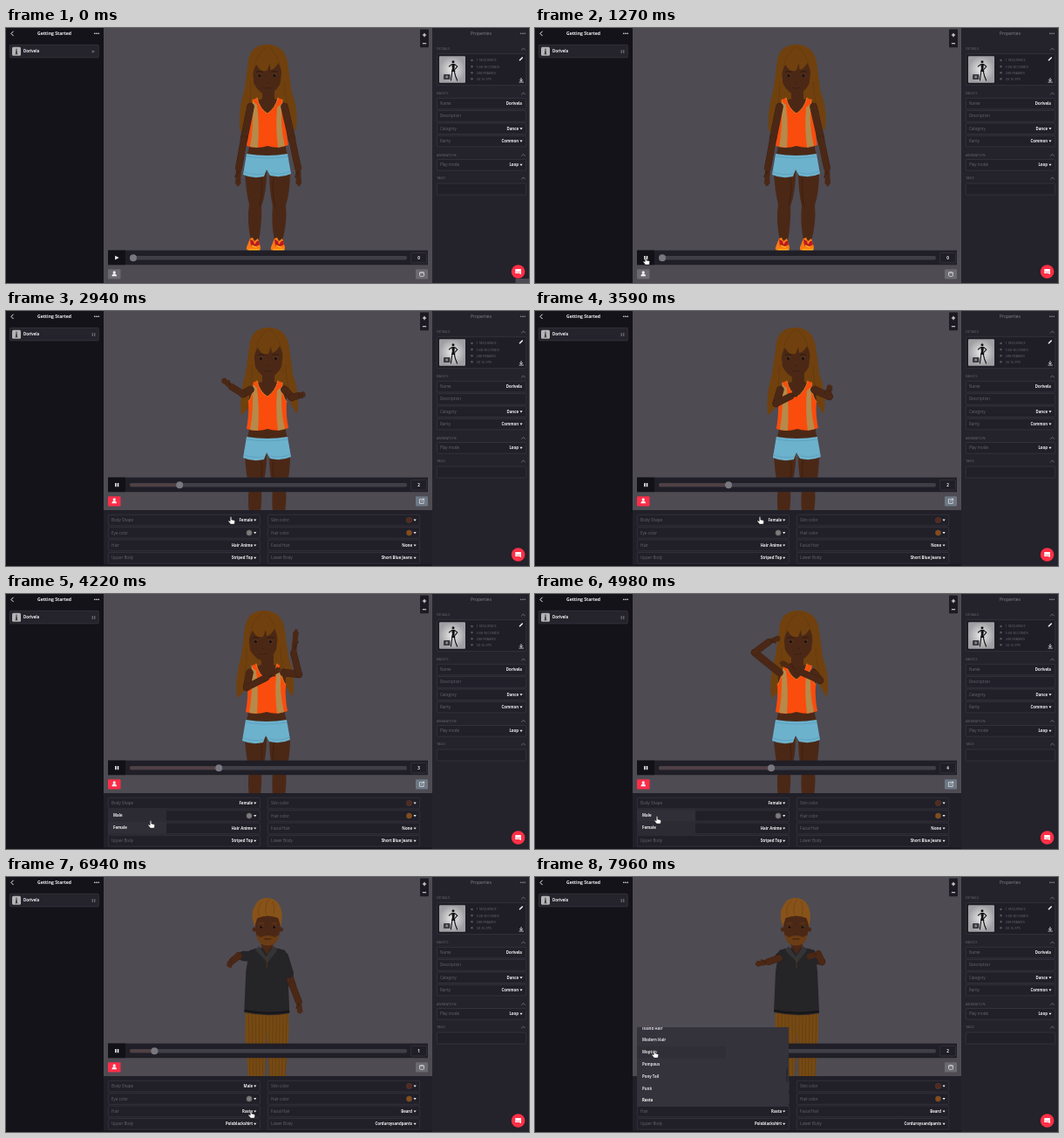
Recreate the animation shown at these times as an HTML page. Size 600x292 px, loop 7990 ms.

```html
<!DOCTYPE html>
<html lang="en">
<head>
<meta charset="utf-8">
<title>Character animation editor</title>
<style>
  html, body { margin: 0; width: 100%; height: 100%; overflow: hidden; background: #16141b; }
  svg { display: block; width: 100vw; height: 100vh; }
  text { font-family: "Open Sans", "Noto Sans", sans-serif; }
</style>
</head>
<body>
<svg id="view" viewBox="0 0 600 292" xmlns="http://www.w3.org/2000/svg"></svg>
<script>
const LOOP = 7990;
const SWITCH = { play: 1190, start: 1430, panel: 2230, shapeMenu: 3800, load: 5450, loaded: 6250, hairMenu: 7000 };
const SPEED = 0.0352; // slider pixels per ms

const WHITE = '#f1f0f2', DIM = '#686670', LINE = '#3a3841', RED = '#ff2d48';

const rect = (x, y, w, h, fill, extra = '') =>
  `<rect x="${x}" y="${y}" width="${w}" height="${h}" fill="${fill}" ${extra}/>`;
const path = (d, fill, extra = '') => `<path d="${d}" fill="${fill}" ${extra}/>`;
const stroke = (d, color, w, extra = '') =>
  path(d, 'none', `stroke="${color}" stroke-width="${w}" stroke-linecap="round" stroke-linejoin="round" ${extra}`);
const circle = (x, y, r, fill, extra = '') => `<circle cx="${x}" cy="${y}" r="${r}" fill="${fill}" ${extra}/>`;
const text = (x, y, s, { size = 4.35, fill = WHITE, bold = true, anchor = 'start' } = {}) =>
  `<text x="${x}" y="${y}" font-size="${size}" fill="${fill}" font-weight="${bold ? 700 : 400}" text-anchor="${anchor}">${s}</text>`;
const label = (x, y, s, size = 4.5) => text(x, y, s, { size, fill: DIM, bold: false });
const group = (id, body) => `<g id="${id}">${body}</g>`;
const at = (x, y, body) => `<g transform="translate(${x} ${y})">${body}</g>`;
const box = (x, y, w, h, fill = 'none') => rect(x, y, w, h, fill, `rx="1" stroke="${LINE}" stroke-width=".7"`);
const arrow = (x, y) => path(`M${x - 1.6} ${y - 1}h3.2l-1.6 2.2z`, WHITE);
const dots = (x, y, fill) => [-2.2, 0, 2.2].map(d => circle(x + d, y, .8, fill)).join('');
const playIcon = (x, y, s, fill) => path(`M${x - s} ${y - s}l${2 * s} ${s}l${-2 * s} ${s}z`, fill);
const pauseIcon = (x, y, s, fill) =>
  rect(x - s, y - s, s * .75, s * 2, fill) + rect(x + s * .25, y - s, s * .75, s * 2, fill);

/* ---------- interface ---------- */
const NAME = 'Dorivela';

function leftPanel() {
  return rect(0, 0, 112, 292, '#15131a') +
    stroke('M8.3 4l-2.4 2.4l2.4 2.4', WHITE, 1) +
    text(55.5, 8.4, 'Getting Started', { size: 5.1, anchor: 'middle' }) + dots(104, 6.3, WHITE) +
    box(4.3, 19.3, 102, 14.6, '#25232b') + rect(7, 21.7, 10, 10, '#b4b3b6', 'rx="1.5"') +
    stroke('M12 24v3m0 0l-.8 3m.8-3l.8 3', '#333', 1) +
    text(20, 28.4, NAME) +
    group('listPlay', playIcon(100.5, 27, 1.8, '#65636b')) +
    group('listPause', pauseIcon(100.5, 27, 1.9, '#65636b'));
}

function rightPanel() {
  const heading = (y, s) => label(494, y + 1.4, s, 4.1) +
    stroke(`M591.5 ${y + 1}l2-2l2 2`, '#8b8991', .7);
  const field = (y, name, value, menu) => box(494.3, y, 102.4, 12.6, '#211f27') +
    label(498, y + 7.8, name) +
    text(menu ? 588 : 592, y + 7.8, value, { anchor: 'end' }) + (menu ? arrow(591, y + 6.3) : '');
  const facts = ['1 SEQUENCE', '9.68 SECONDS', '288 FRAMES', '30.16 FPS']
    .map((s, i) => circle(534.5, 37 + i * 7.1, 1.3, '#55535d') + label(539.5, 38.4 + i * 7.1, s, 3.9)).join('');
  return rect(489, 0, 111, 292, '#24222a') +
    text(545, 8.4, 'Properties', { size: 5, fill: '#85838b', anchor: 'middle', bold: false }) + dots(593, 6.3, '#92909a') +
    heading(24, 'DETAILS') + box(494.3, 29.6, 102.4, 36, '#1f1d25') +
    rect(497, 32.3, 30, 30.4, 'url(#thumb)', 'rx="1"') +
    circle(513, 38.8, 1.5, '#111') +
    path('M511.3 41h3.6l-.4 5.4l1 3.6h-4.6l1-4z', '#111') +
    stroke('M514.8 41.6l3 2.6l-2.6 3M511.4 41.6l-3 2.4M511.8 50l-.6 5l-.8 5M514.4 50l1.2 5l2 5', '#111', 1.1) +
    rect(502, 53, 7.5, 6, '#3b3940', 'rx="1"') + circle(505.7, 56, 1.4, '#8b8a90') + facts +
    stroke('M589.5 36.8l2.8-2.8', WHITE, 1.6) +
    stroke('M591 57.5v3m-1.5-1.2l1.5 1.5l1.5-1.5M589 62h4.4', WHITE, .8) +
    heading(75, 'BASICS') + field(80.3, 'Name', NAME) + field(94.6, 'Description', '') +
    field(108.9, 'Category', 'Dance', true) + field(123.3, 'Rarity', 'Common', true) +
    heading(145.4, 'ANIMATION') + field(150.5, 'Play mode', 'Loop', true) +
    heading(172, 'TAGS') + box(494.3, 178, 102.4, 13, '#211f27') +
    group('corner', rect(584.5, 287, 16, 5, '#4c4a53')) +
    circle(587.6, 279, 7.8, '#ff3047') +
    path('M584.3 276h6.6v6.2l-2-1.2h-4.6z', '#fff') + stroke('M585.8 279.4q1.8 1 3.6 0', RED, .6);
}

function controls() {
  return group('bar',
    rect(117, 254.6, 367, 16.6, '#201e26') + rect(117, 254.6, 20, 16.6, '#131118') +
    group('barPlay', playIcon(127.4, 263.1, 2.3, WHITE)) + group('barPause', pauseIcon(127.2, 263.1, 2.1, WHITE)) +
    rect(142, 260.9, 318, 4.6, '#403e46', 'rx="2"') +
    rect(142, 261.6, 1, 3.2, '#514144', 'id="progress" rx="1.5"') +
    circle(146, 263.2, 4, '#797780', 'id="knob"') +
    box(464.7, 257.4, 17.8, 11.6) +
    `<text id="count" x="473.6" y="264.9" font-size="4.6" font-weight="700" fill="${WHITE}" text-anchor="middle"></text>`) +
    rect(117, 276.2, 14.5, 11.2, '#6b6971', 'id="avatarButton" rx="1"') +
    circle(124.2, 279.9, 1.6, WHITE) + path('M121.3 284.2q.5-3 2.9-3t2.9 3z', WHITE) +
    rect(470, 276.2, 14, 11.2, '#6b6971', 'id="sideButton" rx="1"') +
    group('clockIcon', rect(474.5, 279.5, 5, 4.8, 'none', 'stroke="#eee" stroke-width=".7" rx="1"') + stroke('M474.8 280.8h4.4', '#eee', .6)) +
    group('exportIcon', stroke('M477 279.6h-2.6v4.8h4.8v-2M476.4 282l3.2-2.8m-1.8 0h1.8v1.8', '#eee', .7));
}

const LOOKS = {
  female: ['Female', 'Hair Anime', 'Striped Top', 'None', 'Short Blue Jeans'],
  male: ['Male', 'Rasta', 'Poloblackshirt', 'Beard', 'Corduroysandpants']
};

function panel() {
  const rowY = i => 233.3 + i * 14.4;
  const fields = (x, w, names) => names.map((s, i) =>
    box(x, rowY(i), w, 12.6, '#211f27') + label(x + 3.8, rowY(i) + 7.8, s) + arrow(x + w - 5.6, rowY(i) + 6.3)).join('');
  const values = ([shape, hair, top, beard, legs]) =>
    [[283.2, 0, shape], [283.2, 2, hair], [283.2, 3, top], [466, 2, beard], [466, 3, legs]]
      .map(([x, i, s]) => text(x, rowY(i) + 7.8, s, { anchor: 'end' })).join('');
  const swatch = (x, y, c) => circle(x, y, 3.2, c, 'stroke="#4a464e" stroke-width=".5"');
  return rect(112, 228, 377, 64, '#211f27') + rect(112, 290.3, 377, 1.7, '#17161f') +
    fields(117.3, 174, ['Body Shape', 'Eye color', 'Hair', 'Upper Body']) +
    fields(300.3, 174.4, ['Skin color', 'Hair color', 'Facial Hair', 'Lower Body']) +
    swatch(279, 254, '#7d7b79') + swatch(462.5, 239.4, '#55291a') + swatch(462.5, 254, '#894c15') +
    group('femaleValues', values(LOOKS.female)) + group('maleValues', values(LOOKS.male));
}

function menus() {
  const hair = ['Island Hair', 'Modern Hair', 'Moptop', 'Pompous', 'Pony Tail', 'Punk', 'Rasta'];
  return group('shapeMenu', rect(117, 245.3, 67, 31.6, '#2c2a32', 'rx="1"') +
      rect(117, 247.3, 67, 13, '#302e37', 'id="shapeHover"') +
      text(123, 255.4, 'Male') + text(123, 268.8, 'Female')) +
    group('hairMenu', rect(117, 172, 174, 91, '#34323b') +
      rect(117, 0, 102, 13.6, '#302e37', 'id="hairHover"') +
      `<g clip-path="url(#menuClip)">${hair.map((s, i) =>
        text(123, 174.6 + i * 13.8, s, { fill: i === 6 ? '#fff' : '#dddce0' })).join('')}</g>` +
      rect(288.2, 219, 1.8, 16, '#29272f', 'rx="1"'));
}

const hand = '<g id="hand">' + path('M-.8 0q.8-.8 1.6 0v3l3 .7q.9.3.8 1.2l-.6 3.2h-4.4l-2.4-3.2q-.4-.9.5-1l1.5.9z',
  '#fff', 'stroke="#222" stroke-width=".5" stroke-linejoin="round"') + '</g>';

document.getElementById('view').innerHTML =
  `<defs><radialGradient id="thumb"><stop stop-color="#ececed"/><stop offset="1" stop-color="#a09fa3"/></radialGradient>
   <clipPath id="menuClip"><rect x="117" y="172" width="174" height="91"/></clipPath></defs>` +
  rect(112, 0, 377, 292, '#4e4b53') + group('figure', '') +
  group('spinner', circle(300, 145.5, 4.8, 'none', 'stroke="#302d35" stroke-width="1.1"') +
    stroke('M300 140.7a4.8 4.8 0 0 1 4.8 4.8', '#e03048', 1.1)) +
  rect(475, 1.6, 10, 20.6, '#1c1a22', 'rx="1"') +
  stroke('M478.3 8h3.4m-1.7-1.7v3.4M478.3 17.8h3.4', WHITE, 1.1) +
  group('controls', controls()) + group('panel', panel()) + menus() + leftPanel() + rightPanel() + hand;

/* ---------- character ---------- */
// time, left elbow/wrist/tip, right elbow/wrist/tip, head x, sway
const POSES = [
  [0, 273, 127, 267, 160, 266, 181, 328, 127, 335, 160, 336, 181, 299.5, 0],
  [540, 268, 89, 262, 98, 259, 109, 328, 125, 336, 147, 337, 161, 301, -1],
  [1000, 267, 94, 256, 90, 247, 84, 332, 118, 338, 130, 342, 142, 301, 0],
  [1510, 272, 95, 259, 87, 248, 78, 328, 99, 335, 97, 343, 95, 301, 0],
  [1710, 280, 93, 268, 97, 253, 100, 329, 97, 325, 88, 312, 92, 299.5, 0],
  [2300, 275, 108, 296, 98, 311, 90, 338, 98, 337, 94, 342, 84, 298, 1],
  [2790, 277, 107, 299, 96, 316, 85, 337, 92, 331, 68, 334, 40, 296, -1],
  [3550, 252, 67, 268, 55, 281, 50, 327, 99, 302, 88, 281, 78, 302, 0],
  [4020, 252, 65, 268, 54, 281, 50, 342, 80, 338, 62, 324, 50, 302, 1]
];
const CURSOR = [
  [240, 143, 291], [500, 108, 282], [750, 112, 271], [1010, 127, 263], [1350, 127, 263],
  [1850, 125, 278], [2300, 125, 278], [2780, 258, 236], [3700, 258, 236], [4180, 166, 260],
  [4450, 166, 260], [4900, 140, 255], [5480, 140, 255], [5980, 281, 268], [7050, 281, 268],
  [7500, 137, 232], [7680, 137, 232], [7900, 137, 199]
];

function sample(keys, t) {
  const next = keys.findIndex(k => k[0] > t);
  if (next === 0) return keys[0].slice(1);
  if (next < 0) return keys[keys.length - 1].slice(1);
  const a = keys[next - 1], b = keys[next], u = (t - a[0]) / (b[0] - a[0]), e = u * u * (3 - 2 * u);
  return a.slice(1).map((v, i) => v + (b[i + 1] - v) * e);
}

const SKIN = '#4b2816', SHADE = '#402112';

function arm(sx, sy, [ex, ey, wx, wy, tx, ty], sleeve) {
  const dx = tx - wx, dy = ty - wy, len = Math.hypot(dx, dy) || 1, nx = -dy / len, ny = dx / len;
  const along = (u, k) => `${wx + dx * u + nx * k} ${wy + dy * u + ny * k}`;
  const fingers = [-2.4, -.8, .8, 2.4].map(k =>
    stroke(`M${along(.4, k * .7)}L${along(1 - Math.abs(k) * .06, k)}`, SKIN, 1.9)).join('');
  const thumb = stroke(`M${along(.2, 0)}L${along(.5, 3.4)}`, SHADE, 1.8);
  const upper = `M${sx} ${sy}L${ex} ${ey}`, fore = `M${ex} ${ey}L${wx} ${wy}`;
  const cuff = `M${sx} ${sy}L${sx + (ex - sx) * .6} ${sy + (ey - sy) * .6}`;
  return stroke(upper, SHADE, 8.6) + stroke(upper, SKIN, 7.6) + (sleeve ? stroke(cuff, sleeve, 11.5) : '') +
    stroke(fore, SHADE, 7.8) + stroke(fore, SKIN, 6.8) +
    stroke(`M${along(0, 0)}L${along(.4, 0)}`, SKIN, 6) + thumb + fingers;
}

const face = brow =>
  path('M-17-7Q-17-18 0-19Q17-18 17-7L15 10Q9 21 0 23Q-9 21-15 10z', SKIN) +
  [-8.5, 8.5].map(x => `<ellipse cx="${x}" cy="0" rx="2.7" ry="1.9" fill="#5e3a22"/>` + circle(x, .2, 1.7, '#140c09') +
    circle(x + .5, -.4, .4, '#b8a28c') + stroke(`M${x - 3.4} -3.8q3.4-1.6 6.8 0`, brow, .9)).join('') +
  stroke('M-1 8.5q1.2.8 2.4 0M-4 14.5q4 1.3 8 0', '#371d10', .7);

const shoe = x =>
  path(`M${x - 5} 241l3-1l2 4l4-3l3 10q0 4-4 4h-9q-4 0-3-4z`, '#ff7a12') +
  path(`M${x - 5} 242l4 2l1 4l3-4l2 0l1 4l-4 2h-6z`, '#b81a22') +
  stroke(`M${x - 6} 253.8h12M${x - 3} 249l5 2`, '#ffc51f', 1.3);

function femaleFigure(pose) {
  const [headX, sway] = pose.slice(12), HAIR = '#70410e', HAIR_DARK = '#62390d';
  const legs = path('M274 164H299Q299 188 293 204Q294 220 290 244H281Q276 220 279 202Q275 186 274 164z', SKIN) +
    path('M302 164H326Q326 188 321 203Q323 222 317 244H308Q304 222 306 204Q302 186 302 164z', SKIN) +
    stroke('M293 172Q295 188 291 203M307 172Q305 190 309 204', SHADE, 1.4) + shoe(285) + shoe(313);
  const backHair = at(headX, 54,
    path('M-22-12Q-21-35 0-35Q21-35 24-12L28 18Q37 42 33 64Q24 54 17 28L-16 28Q-18 58-31 65Q-34 44-26 16z', HAIR));
  const shorts = path('M276 144Q300 148 323 144L327 167Q316 172 303 169L299 162L296 170Q283 173 272 168z', '#6db2cd') +
    stroke('M276 147Q300 151 323 147M273 165Q284 169 296 167M304 166Q316 169 326 164', '#5b9fbc', .8);
  const top = path('M283 82L288 80Q291 93 300 98Q309 92 312 80L317 82Q316 97 322 104Q321 120 324 134Q312 139 300 135Q288 139 276 135Q279 118 278 104Q284 97 283 82z', '#fa4c0d') +
    path('M283 84L288 88Q291 112 289 137L280 136Q284 116 283 84zM311 91L317 86Q314 112 320 135L312 137Q309 114 311 91z', '#b58a4a') +
    stroke('M283 82Q284 97 278 104M317 82Q316 97 322 104M288 80Q291 93 300 98Q309 92 312 80', '#f0902a', .7);
  const torso = path('M294 70H308V81L322 86L321 138L324 149H276L279 136L279 86L294 81z', SKIN);
  const head = at(headX, 54, face('#2c190d') +
    path('M-22 9Q-25-35 0-35Q25-35 23 10L17 4Q17-7 13-14Q9-7 4-6L3-13L0-5Q-8-3-12-12Q-16-8-17 6z', HAIR) +
    path('M-21-2L-16 2Q-15 26-20 40Q-25 24-21-2zM21 0L17 4Q17 24 21 38Q26 22 21 0z', HAIR) +
    stroke('M0-33Q-12-25-14-10M2-33Q12-24 15-10M-19 8Q-18 25-22 40M20 8Q20 25 25 40', HAIR_DARK, .8));
  return backHair + legs +
    at(sway, 0, torso + shorts + top + head + arm(280.5, 90, pose.slice(0, 6)) + arm(319.5, 90, pose.slice(6, 12)));
}

function maleFigure(pose) {
  const [headX, sway] = pose.slice(12), HAIR = '#87531a', BEARD = '#6b3d15', SHIRT = '#252427';
  const ribs = Array.from({ length: 12 }, (_, i) => `M${279 + i * 4} 156L${281 + i * 3.6} 242`).join('');
  const pants = path('M276 150H325L325 180L320 246H304L300 178L296 246H280L275 180z', '#764a14') +
    stroke(ribs, '#643e10', .8) + shoe(287) + shoe(313);
  const shirt = path('M280 84Q290 80 300 82Q311 80 321 84L324 108L326 156Q300 161 274 155L276 108z', SHIRT) +
    path('M291 79L299 91L308 79L312 84L301 98L287 84z', '#343336') + path('M293 77H307L300 89z', SKIN) +
    stroke('M300 92V104', '#5c3d1c', .7) + stroke('M275 153Q300 158 325 154', '#151417', 2);
  const head = at(headX, 57, circle(-15, 3, 2.6, SKIN) + circle(15, 3, 2.6, SKIN) +
    `<g transform="scale(.88 .94)">${face(BEARD)}</g>` +
    path('M-13 9L-8 12Q0 8 8 12L13 9Q12 17 7 20Q0 23-7 20Q-12 17-13 9z', BEARD) + stroke('M-3.5 14h7', '#371d10', 1.2) +
    path('M-15 0Q-21-16-14-25Q-11-32-3-33Q7-34 12-27Q19-18 15 0L12-10Q0-15-12-10z', HAIR) +
    stroke('M-10-13Q-13-22-6-29M-2-15Q-4-24 1-31M7-14Q9-22 6-29', '#75460f', .9));
  return at(sway, 0, pants + path('M294 70H307V85H294z', SKIN) + shirt + head +
    arm(282, 91, pose.slice(0, 6), SHIRT) + arm(319, 91, pose.slice(6, 12), SHIRT));
}

/* ---------- timeline ---------- */
const $ = id => document.getElementById(id);
const show = (id, on) => $(id).setAttribute('display', on ? 'inline' : 'none');
const set = (id, name, value) => $(id).setAttribute(name, value);

function render(t) {
  const playing = t >= SWITCH.play, open = t >= SWITCH.panel, male = t >= SWITCH.load;
  const loading = male && t < SWITCH.loaded;
  const elapsed = Math.max(0, t - (male ? SWITCH.loaded : SWITCH.start));
  const pose = sample(POSES, elapsed);
  $('figure').innerHTML = loading ? '' : male ? maleFigure(pose) : femaleFigure(pose);

  show('spinner', loading);
  set('spinner', 'transform', `rotate(${(t - 6080) * .36} 300 145.5)`);
  show('bar', !loading);
  set('controls', 'transform', `translate(0 ${open ? -64 : 0})`);
  for (const id of ['listPlay', 'barPlay']) show(id, !playing);
  for (const id of ['listPause', 'barPause']) show(id, playing);

  const x = 146 + elapsed * SPEED;
  set('knob', 'cx', x);
  set('progress', 'width', x - 142);
  $('count').textContent = Math.round(elapsed * 1.1 / 1000);

  const exporting = open && !male;
  set('avatarButton', 'fill', open ? RED : '#6b6971');
  set('sideButton', 'fill', exporting ? '#6d7884' : '#6b6971');
  show('exportIcon', exporting);
  show('clockIcon', !exporting);

  show('panel', open);
  show('femaleValues', !male);
  show('maleValues', male);

  const [cx, cy] = sample(CURSOR, t);
  show('shapeMenu', t >= SWITCH.shapeMenu && !male);
  set('shapeHover', 'y', cy < 259 ? 247.3 : 260.8);
  show('hairMenu', t >= SWITCH.hairMenu);
  const row = Math.min(6, Math.max(0, Math.round((cy + 1 - 173) / 13.8)));
  set('hairHover', 'y', Math.min(249.4, 166.2 + row * 13.8));

  show('corner', t < 30);
  show('hand', t >= 240);
  set('hand', 'transform', `translate(${cx} ${cy})`);
}

const begin = performance.now();
function tick() {
  render((performance.now() - begin) % LOOP);
  requestAnimationFrame(tick);
}
tick();
</script>
</body>
</html>
```
